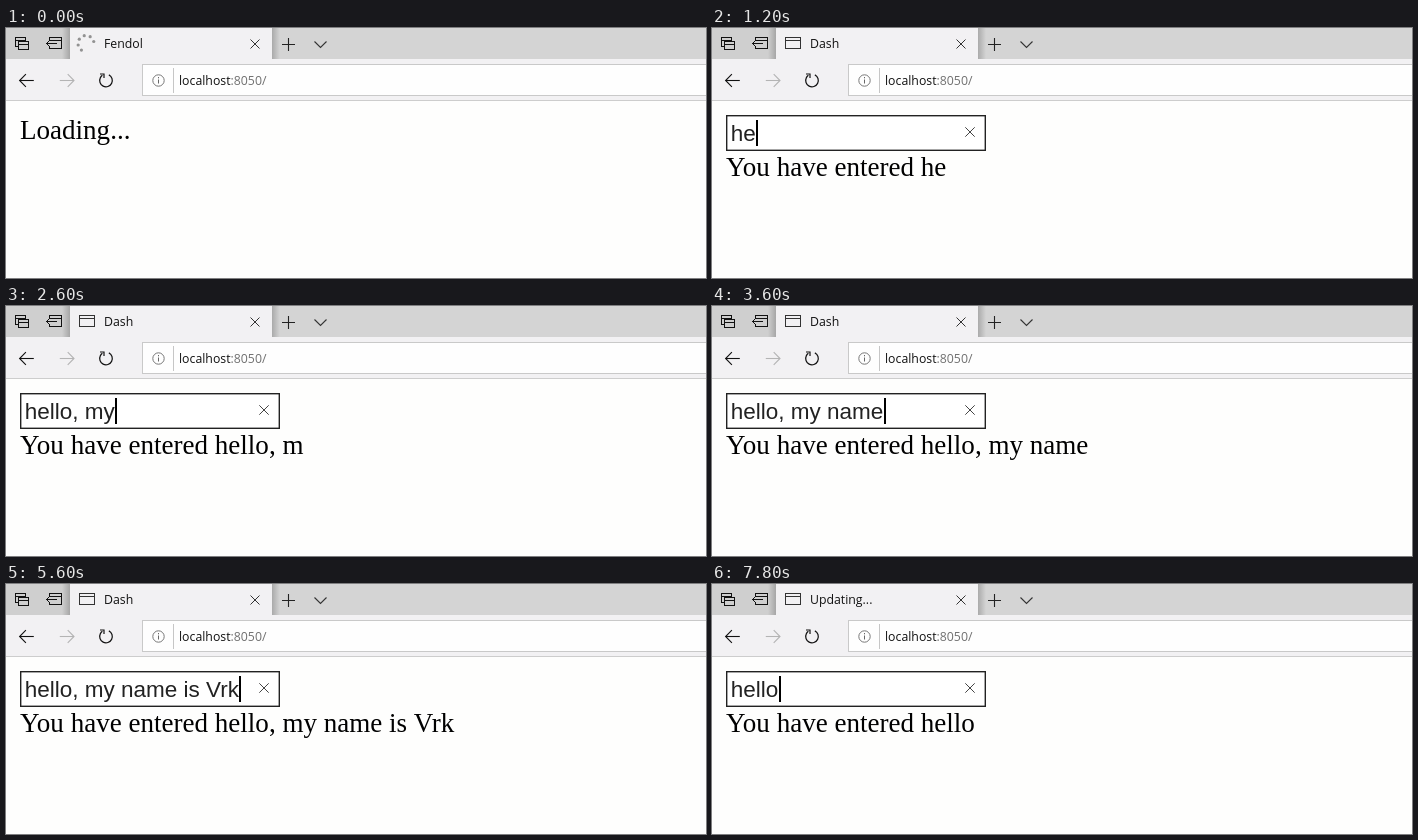
Recreate the animation shown at these times as an HTML page with a canvas. Size 700 by 250 pixels, loop 8000 ms.

```html
<!DOCTYPE html>
<html lang="en">
<head>
<meta charset="utf-8">
<title>Text input demo</title>
<style>
  html, body { margin: 0; width: 100%; height: 100%; overflow: hidden; background: #fefefd; }
  canvas { display: block; width: 700px; height: 250px; }
</style>
</head>
<body>
<canvas id="stage" width="700" height="250"></canvas>
<script>
const ctx = document.getElementById('stage').getContext('2d');
const LOOP = 8000;
const TICK = 200;
const UI = '12.3px "Open Sans", "Noto Sans", sans-serif';
const SERIF = '27.05px "Liberation Serif", "Times New Roman", serif';
const SANS = '22.5px "Liberation Sans", Arial, sans-serif';
const INK = '#111';

const PHRASE = 'hello, my name is Vrko';
const START = 'initial value';

const LOADED = 200, ECHOED = 400, FOCUSED = 800, ANSWERED = 1200, CAUGHT_UP = 5400;

// Typing rhythm: [time, characters typed], even pace in between
const PACE = [
  [FOCUSED, 2], [ANSWERED, 2], [3400, 14], [3800, 14], [CAUGHT_UP, 22],
  [5800, 20], [6600, 20], [6800, 22], [7000, 21], [7200, 21], [7800, 5]
];

function typedAt(time) {
  if (time < FOCUSED) return START;
  const i = PACE.findIndex(key => key[0] > time);
  if (i < 0) return PHRASE.slice(0, PACE.at(-1)[1]);
  const [t0, n0] = PACE[i - 1], [t1, n1] = PACE[i];
  const count = n0 + (n1 - n0) * (time - t0) / (t1 - t0);
  return PHRASE.slice(0, Math.floor(count + 1e-6));
}

// The answer trails the typing by one tick until it catches up
function echoAt(time) {
  if (time < ANSWERED) return START;
  return typedAt(time < CAUGHT_UP ? time - TICK : time);
}

function titleAt(time) {
  if (time < LOADED) return 'Fendol';
  const waiting = time < ECHOED || (time >= FOCUSED && time < ANSWERED) || time >= LOOP - TICK;
  return waiting ? 'Updating...' : 'Dash';
}

function rect(x, y, w, h, fill) {
  ctx.fillStyle = fill;
  ctx.fillRect(x, y, w, h);
}

function frame(x, y, w, h, color, width = 1) {
  ctx.strokeStyle = color;
  ctx.lineWidth = width;
  ctx.strokeRect(x, y, w, h);
}

// Each path is a flat list of x, y pairs
function lines(color, width, ...paths) {
  ctx.strokeStyle = color;
  ctx.lineWidth = width;
  ctx.beginPath();
  for (const p of paths) {
    ctx.moveTo(p[0], p[1]);
    for (let i = 2; i < p.length; i += 2) ctx.lineTo(p[i], p[i + 1]);
  }
  ctx.stroke();
}

function arc(x, y, r, from, to, color, width) {
  ctx.strokeStyle = color;
  ctx.lineWidth = width;
  ctx.beginPath();
  ctx.arc(x, y, r, from, to);
  ctx.stroke();
}

function label(str, x, y, font, color) {
  ctx.font = font;
  ctx.fillStyle = color;
  ctx.fillText(str, x, y);
  return ctx.measureText(str).width;
}

function cross(x, y, r, color) {
  lines(color, 1, [x - r, y - r, x + r, y + r], [x + r, y - r, x - r, y + r]);
}

// V shape with its tip at x, y, opening towards dx or dy
function chevron(x, y, dx, dy, size, color, width) {
  const sx = dx || 1, sy = dy || 1;
  lines(color, width, [x + sx * size, y + sy * size, x, y,
    x + (dx ? sx : -1) * size, y + (dy ? sy : -1) * size]);
}

function shade(x0, x1) {
  const g = ctx.createLinearGradient(x0, 0, x1, 0);
  g.addColorStop(0, 'rgba(0,0,0,0)');
  g.addColorStop(1, 'rgba(0,0,0,0.2)');
  rect(Math.min(x0, x1), 0, Math.abs(x1 - x0), 32, g);
}

function spinner(x, y) {
  ctx.fillStyle = '#929292';
  for (let i = 0; i < 6; i++) {
    const a = 2.18 + i * 0.77;
    ctx.beginPath();
    ctx.arc(x + 8 * Math.cos(a), y + 8 * Math.sin(a), 1.6, 0, 7);
    ctx.fill();
  }
}

function windowIcon(x, y, w, h, color) {
  frame(x, y, w, h, color);
  lines(color, 1, [x, y + 3, x + w, y + 3]);
}

function tabStrip(title, loading) {
  rect(0, 0, 700, 32, '#d4d4d4');
  rect(0, 0, 64, 32, '#cfcfcf');
  shade(56, 64);
  shade(274, 266);
  rect(64, 0, 202, 32, '#f2f1f3');

  windowIcon(9.5, 9.5, 10, 9, INK);
  rect(12, 13, 11, 9, '#cfcfcf');
  windowIcon(12.5, 13.5, 10, 8, INK);

  windowIcon(43.5, 9.5, 12, 11, INK);
  rect(42, 13, 3, 5, '#cfcfcf');
  lines(INK, 1, [40, 15.5, 51, 15.5]);
  chevron(40.5, 15.5, 1, 0, 3, INK, 1);

  if (loading) spinner(80, 15.5);
  else windowIcon(73.5, 9.5, 15, 11, '#333');
  label(title, 98, 20, UI, INK);
  cross(249, 16, 4.5, '#333');
  lines('#222', 1.1, [276, 16.5, 289, 16.5], [282.5, 10, 282.5, 23]);
  chevron(314.5, 19.5, 0, -1, 6, '#333', 1.1);
}

function arrow(x, dir, color) {
  const tip = x + dir * 7.2;
  lines(color, 1.1, [x - dir * 7, 52.5, tip, 52.5]);
  chevron(tip, 52.5, -dir, 0, 6.3, color, 1.1);
}

function toolbar() {
  rect(0, 31, 700, 41, '#f2f1f3');
  rect(0, 72, 700, 1, '#cdcdcd');
  arrow(20.8, -1, INK);
  arrow(60.8, 1, '#b4b4b4');
  arc(100, 52.5, 6.3, -1.1, 4.1, INK, 1.2);
  lines(INK, 1.2, [94, 46, 98, 46, 98, 50]);

  rect(136, 36, 564, 32, '#fefefe');
  frame(136.5, 36.5, 570, 31, '#c9c9c9');
  arc(152.5, 52.5, 5.7, 0, 7, '#777', 1);
  rect(152, 51.5, 1, 4, '#666');
  rect(152, 49, 1, 1.3, '#666');
  rect(167, 40, 1, 25, '#c6c6c6');
  const w = label('localhost', 173, 57, UI, INK);
  label(':8050/', 173 + w, 57, UI, '#707070');
}

function field(str, focused) {
  rect(14, 87, 260, 36, '#fff');
  frame(14.7, 87.7, 258.6, 34.6, focused ? '#222' : '#8c8c8c', 1.4);
  ctx.font = SANS;
  const width = ctx.measureText(str).width;
  const end = Math.min(18.8 + width, 241);
  ctx.save();
  ctx.beginPath();
  ctx.rect(19, 89, 225, 32);
  ctx.clip();
  label(str, end - width, 113, SANS, '#222');
  if (focused) rect(Math.round(end + 0.3), 92, 2, 26, '#000');
  ctx.restore();
  if (focused) cross(258, 104, 4.7, '#444');
}

function draw(time) {
  const loading = time < LOADED;
  rect(0, 0, 700, 250, '#fefefd');
  tabStrip(titleAt(time), loading);
  toolbar();
  if (loading) {
    label('Loading...', 14, 111, SERIF, '#000');
    return;
  }
  field(typedAt(time), time >= FOCUSED);
  if (time >= ECHOED) label('You have entered ' + echoAt(time), 14, 148, SERIF, '#000');
}

const t0 = performance.now();
function tick() {
  const time = (performance.now() - t0) % LOOP;
  draw(Math.floor(time / TICK) * TICK);
  requestAnimationFrame(tick);
}
// Frames at 5600 ms and later answer without delay
tick();
</script>
</body>
</html>
```
